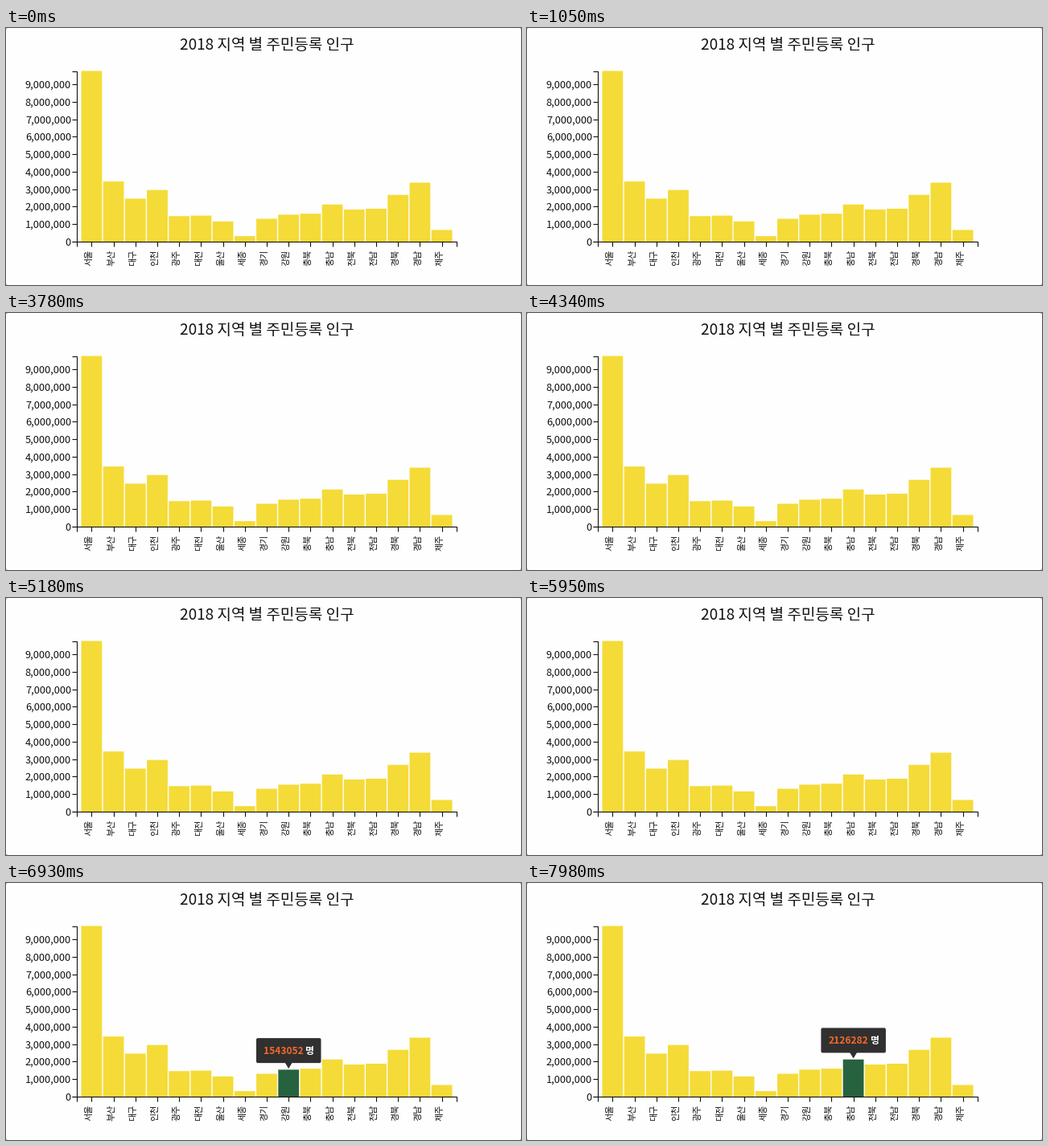
Write a matplotlib script that moves like this. It is 640 px wide and 320 px high and loops after 8000 ms.

```python
import matplotlib.pyplot as plt
from matplotlib.animation import FuncAnimation
from matplotlib.patches import FancyBboxPatch, Polygon, Rectangle

W, H, DPI = 640, 320, 100
INTERVAL, LOOP = 40, 8000
FONT = "Noto Sans CJK JP"
YELLOW, GREEN, DARK, ORANGE = "#f5db37", "#27623f", "#303030", "#f26a2b"
INK = "#111111"

POPULATION = {
    "서울": 9765623, "부산": 3441453, "대구": 2461769, "인천": 2954642,
    "광주": 1459336, "대전": 1489936, "울산": 1155623, "세종": 314126,
    "경기": 1307715, "강원": 1543052, "충북": 1599252, "충남": 2126282,
    "전북": 1836832, "전남": 1882970, "경북": 2676831, "경남": 3373988,
    "제주": 667191,
}
# (start in ms, hovered region)
HOVERS = [(0, None), (6920, "강원"), (7480, "충북"), (7840, "충남")]

LEFT, RIGHT, TOP, BASE = 87.5, 560, 53.5, 266
BAR_X, STEP, BAR_W = 93.5, 27.2, 25.8
TICK = 5.5
SCALE = (BASE - TOP) / max(POPULATION.values())

fig = plt.figure(figsize=(W / DPI, H / DPI), dpi=DPI, facecolor="#b8b8b8")
ax = fig.add_axes([0, 0, 1, 1])
ax.set_xlim(0, W)
ax.set_ylim(H, 0)
ax.axis("off")


def label(x, y, text, px, **kw):
    kw = {"color": INK, "va": "baseline", **kw}
    return ax.text(x, y, text, fontsize=px * 72 / DPI, family=FONT, **kw)


def line(xs, ys):
    ax.plot(xs, ys, color=INK, lw=0.8, solid_capstyle="butt",
            solid_joinstyle="miter", zorder=3)


def y_of(value):
    return BASE - value * SCALE


def rounded(x, y, w, h, r, color, **kw):
    return ax.add_patch(FancyBboxPatch(
        (x, y), w, h, boxstyle=f"round,pad=0,rounding_size={r}",
        fc=color, ec="none", **kw))


rounded(0, 0, W, H, 3, "#fefefe", zorder=0)
label(324.5, 27, "2018 지역 별 주민등록 인구", 19, ha="center")

line([LEFT - TICK, LEFT, LEFT, LEFT - TICK], [TOP, TOP, BASE, BASE])
line([LEFT, LEFT, RIGHT, RIGHT], [BASE + TICK, BASE, BASE, BASE + TICK])
for value in range(0, 9_000_001, 1_000_000):
    y = y_of(value)
    line([LEFT - TICK, LEFT], [y, y])
    label(81, y + 4.6, f"{value:,}", 12.8, ha="right")

bars, centers = {}, {}
for i, (name, value) in enumerate(POPULATION.items()):
    x = BAR_X + i * STEP
    cx = centers[name] = x + BAR_W / 2
    bars[name] = ax.add_patch(Rectangle(
        (x, y_of(value)), BAR_W, value * SCALE, fc=YELLOW, ec="none",
        snap=False, zorder=2))
    line([cx, cx], [BASE, BASE + TICK])
    label(cx + 0.5, 275.5, name, 11, rotation=90,
          rotation_mode="anchor", ha="right")

box = rounded(0, 0, 80.5, 31, 2, DARK, zorder=4)
arrow = ax.add_patch(Polygon([(0, 0), (1, 0), (0, 1)], fc=DARK, ec="none",
                             zorder=4))
count = label(0, 0, "", 12, color=ORANGE, weight="bold", zorder=5)
unit = label(0, 0, "명", 12, color="white", weight="bold", ha="right", zorder=5)
tip = [box, arrow, count, unit]


def update(frame):
    t = frame * INTERVAL
    hovered = [name for start, name in HOVERS if start <= t][-1]
    for name, bar in bars.items():
        bar.set_facecolor(GREEN if name == hovered else YELLOW)
    for part in tip:
        part.set_visible(hovered is not None)
    if hovered:
        cx, value = centers[hovered], POPULATION[hovered]
        bottom = y_of(value) - 8.3
        box.set_bounds(cx - 40.2, bottom - 31, 80.5, 31)
        arrow.set_xy([(cx - 4.5, bottom - 0.5), (cx + 4.5, bottom - 0.5),
                      (cx, bottom + 7)])
        count.set_text(str(value))
        count.set_position((cx - 30.7, bottom - 11))
        unit.set_position((cx + 31.3, bottom - 11))
    return [*bars.values(), *tip]


anim = FuncAnimation(fig, update, frames=LOOP // INTERVAL, interval=INTERVAL,
                     repeat=True, repeat_delay=0, blit=False)
plt.show()
```
